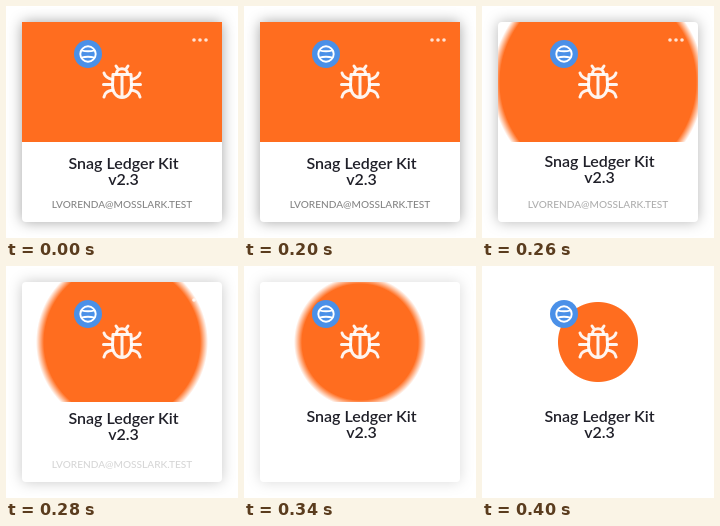
These frames come from a looping animation (232 by 232 pixels, 0.44 s). An HTML page:

```html
<!DOCTYPE html>
<html lang="en">
<head>
<meta charset="utf-8">
<title>Card collapsing to an icon</title>
<style>
  html, body { margin: 0; width: 100%; height: 100%; overflow: hidden; background: #fff; }
  svg { display: block; width: 232px; height: 232px; }
  text { font-family: Lato, "Open Sans", sans-serif; text-anchor: middle; }
  .line { fill: none; stroke: #fff; stroke-linecap: round; stroke-linejoin: round; }
</style>
</head>
<body>
<svg viewBox="0 0 232 232">
  <defs>
    <radialGradient id="spot" gradientUnits="userSpaceOnUse" cx="116" cy="76" r="126">
      <stop id="solid" offset="1" stop-color="#ff6d1f"/>
      <stop offset="1" stop-color="#ff6d1f" stop-opacity="0"/>
    </radialGradient>
  </defs>

  <rect id="card" x="16" y="16" width="200" height="200" rx="4" fill="#fff"/>
  <rect x="16" y="16" width="200" height="120" fill="url(#spot)"/>

  <g fill="#fff" fill-opacity=".8">
    <circle cx="188" cy="34" r="1.8"/>
    <circle cx="194" cy="34" r="1.8"/>
    <circle cx="200" cy="34" r="1.8"/>
  </g>

  <!-- bug -->
  <g class="line" stroke-width="3" stroke-opacity=".92">
    <path d="M107 68.5h18l.5 11c0 7-4 12-9.500 12s-9.500-5-9.500-12zM116 69v22"/>
    <path d="M110.500 67.500c0-6.500 11-6.500 11 0M112 63l-2-3M120 63l2-3"/>
    <path id="legs" d="M98 67c1 4 4 5.500 8.500 6.500M97.500 78.500h9M98 91c1-5 4-6 9-7"/>
    <use href="#legs" transform="matrix(-1 0 0 1 232 0)"/>
  </g>

  <!-- badge -->
  <circle cx="82" cy="48" r="14" fill="#4a90e8"/>
  <g class="line" stroke-width="1.9">
    <circle cx="82" cy="48" r="7.700"/>
    <path d="M75.500 44.300q6.500 1.800 13 0M75.500 51.700q6.500-1.800 13 0"/>
  </g>

  <g id="title" font-size="16" font-weight="600" fill="#202029">
    <text x="117.500" y="163">Snag Ledger Kit</text>
    <text x="117.500" y="179">v2.3</text>
  </g>
  <text id="mail" x="116" y="201.500" font-size="10.1" font-weight="500" fill="#868686">LVORENDA@MOSSLARK.TEST</text>
</svg>

<script>
  const LOOP = 440, START = 200, STEP = 40, STEPS = 5;
  const RADIUS = [122, 102, 82, 62, 46.5, 40];
  const SOFT = [4, 4, 4, 4, 2.5, 0.5];
  const el = id => document.getElementById(id);
  const [spot, solid, card, title, mail] = ['spot', 'solid', 'card', 'title', 'mail'].map(el);

  // cubic-bezier(.25, .1, .25, 1), solved by bisection
  const bezier = (a, b, s) => 3 * a * s * (1 - s) ** 2 + 3 * b * s * s * (1 - s) + s ** 3;
  function ease(x) {
    let lo = 0, hi = 1;
    for (let i = 0; i < 24; i++) {
      const mid = (lo + hi) / 2;
      if (bezier(.25, .25, mid) < x) lo = mid; else hi = mid;
    }
    return bezier(.1, 1, lo);
  }

  function draw(time) {
    // the collapse advances in hard 40 ms steps
    const n = Math.min(STEPS, Math.max(0, Math.floor((time % LOOP - START) / STEP)));
    const p = n / STEPS;
    const outer = RADIUS[n] + SOFT[n];

    spot.setAttribute('r', outer);
    solid.setAttribute('offset', (RADIUS[n] - SOFT[n]) / outer);
    card.style.filter = p < 1 ? `drop-shadow(0 0 7px rgba(0,0,0,${.36 * (1 - p)}))` : 'none';
    title.setAttribute('transform', `translate(0 ${-7.5 * ease(p)})`);
    mail.setAttribute('opacity', Math.max(0, 1 - p / .6));
  }

  const origin = performance.now();
  function tick() {
    draw(performance.now() - origin);
    requestAnimationFrame(tick);
  }
  tick();
</script>
</body>
</html>
```
